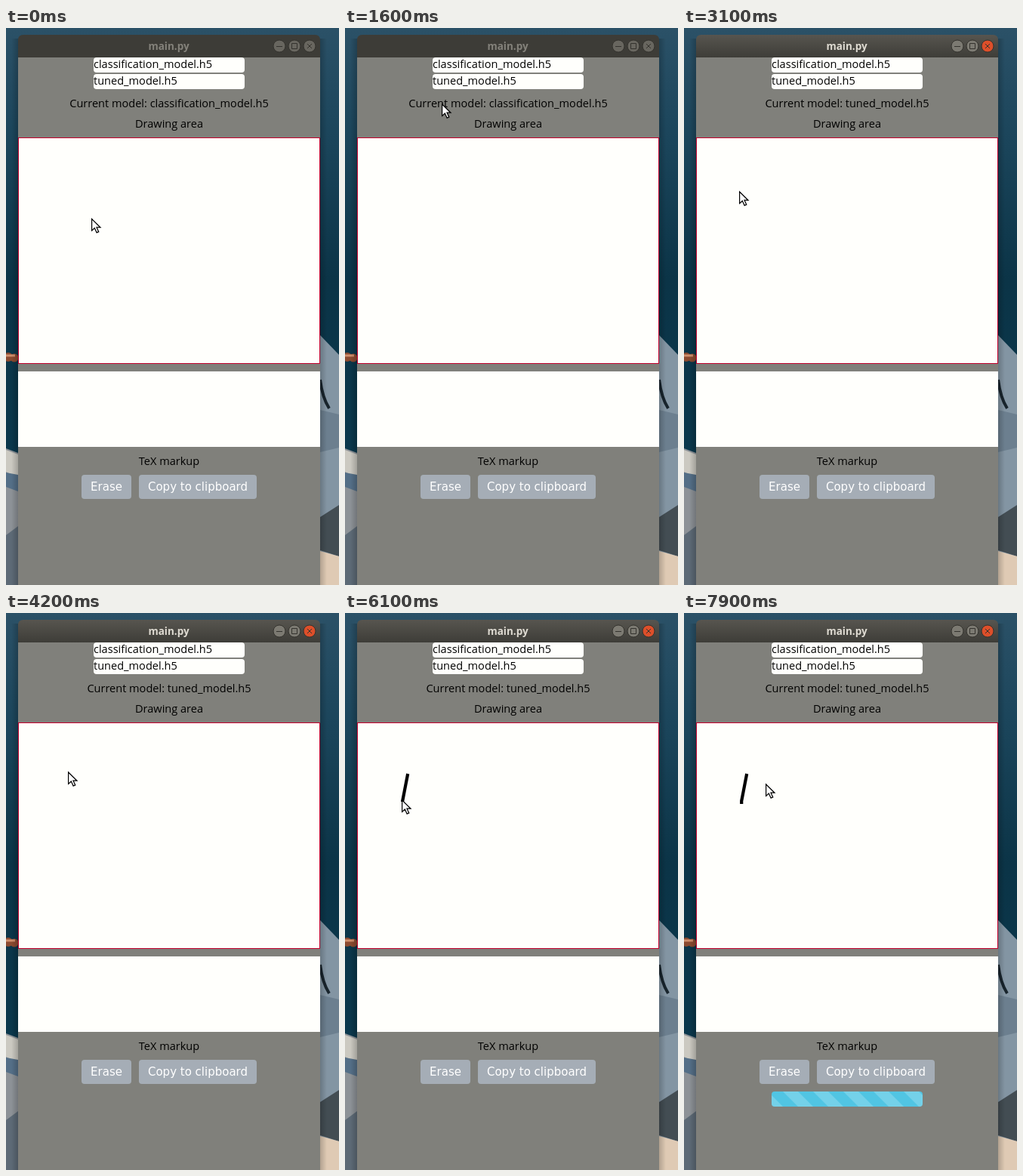
Recreate the animation shown at these times as an HTML page. Size 441 by 738 pixels, loop 8 s.

```html
<!DOCTYPE html>
<html lang="en">
<head>
<meta charset="utf-8">
<title>main.py</title>
<style>
  html, body { margin: 0; width: 100%; height: 100%; overflow: hidden; background: #808079; }
  svg { display: block; width: 441px; height: 738px; }
  text { font: 14.55px "Open Sans", "Noto Sans", sans-serif; }
  .mid { text-anchor: middle; }
  .title { font-size: 13.5px; font-weight: 700; }
  .btn { font: 15px "DejaVu Sans", sans-serif; fill: #fff; }
</style>
</head>
<body>
<svg viewBox="0 0 441 738">
  <defs>
    <linearGradient id="sea" x2="0" y2="1">
      <stop offset="0" stop-color="#2b5167"/>
      <stop offset=".2" stop-color="#1b455b"/>
      <stop offset=".45" stop-color="#0b3447"/>
      <stop offset="1" stop-color="#0a3a50"/>
    </linearGradient>
    <linearGradient id="bar" x2="0" y2="1">
      <stop offset="0" stop-color="#57554f"/>
      <stop offset="1" stop-color="#3e3d38"/>
    </linearGradient>
    <linearGradient id="shade">
      <stop offset="0" stop-opacity="0"/>
      <stop offset="1" stop-opacity=".2"/>
    </linearGradient>
    <pattern id="stripes" width="40" height="40" patternUnits="userSpaceOnUse">
      <path d="M0 0H20L40 20V40ZM0 20 20 40H0Z" fill="#fff" fill-opacity=".2"/>
    </pattern>
  </defs>

  <!-- wallpaper -->
  <rect width="441" height="738" fill="url(#sea)"/>
  <g fill="#8b4a30">
    <circle cx="3" cy="436" r="6"/>
    <circle cx="11" cy="437" r="5.5"/>
  </g>
  <path d="M0 434H12" stroke="#cf8e6c" stroke-width="3"/>
  <path d="M0 557 16 563V738H0Z" fill="#8d9297"/>
  <path d="M0 559 16 565V596L0 588Z" fill="#cbc9c1"/>
  <path d="M0 589 16 592V614L0 608Z" fill="#546f87"/>
  <path d="M0 672 16 660V738H0Z" fill="#5d6a76"/>
  <path d="M416 407 441 433V738H416Z" fill="#8395a3"/>
  <path d="M416 466Q419 490 428 504" fill="none" stroke="#18242c" stroke-width="4"/>
  <path d="M416 506 441 512V556L416 562Z" fill="#6c7f8f"/>
  <path d="M416 648 441 632V700L416 692Z" fill="#434d53"/>
  <path d="M416 693 441 700V738H416Z" fill="#dfcab4"/>
  <rect x="7" y="14" width="9" height="724" fill="url(#shade)"/>
  <rect x="-425" y="14" width="9" height="724" fill="url(#shade)" transform="scale(-1 1)"/>

  <!-- window -->
  <path id="head" d="M16 39V16Q16 9 23 9H409Q416 9 416 16V39Z"/>
  <text id="name" class="mid title" x="215.5" y="29">main.py</text>
  <g id="controls" stroke="#34332e">
    <circle cx="362" cy="24" r="8"/>
    <circle cx="382" cy="24" r="8"/>
    <circle id="close" cx="402" cy="24" r="8"/>
    <path d="M358 24.5h8M378.5 20.5h7v7h-7ZM399 21l6 6M405 21l-6 6" fill="none"/>
  </g>
  <rect x="16" y="39" width="400" height="699" fill="#80807b"/>
  <g fill="#fffffc">
    <rect x="116" y="39" width="200" height="20" rx="4"/>
    <rect x="116" y="61" width="200" height="20" rx="4"/>
    <rect x="16.5" y="145.5" width="399" height="299" stroke="#c4002c"/>
    <rect x="16" y="455" width="400" height="100"/>
  </g>
  <text x="116" y="53">classification_model.h5</text>
  <text x="116" y="75">tuned_model.h5</text>
  <text id="model" class="mid" x="216" y="105"></text>
  <text class="mid" x="216" y="132">Drawing area</text>
  <text class="mid" x="216" y="579">TeX markup</text>
  <g fill="#a5adb6">
    <rect x="100" y="592" width="66" height="32" rx="4"/>
    <rect x="176" y="592" width="156" height="32" rx="4"/>
  </g>
  <text class="mid btn" x="133" y="613">Erase</text>
  <text class="mid btn" x="254" y="613">Copy to clipboard</text>
  <g id="progress">
    <rect x="116" y="634" width="200" height="20" rx="4" fill="#51c5e3"/>
    <rect x="116" y="634" width="200" height="20" rx="4" fill="url(#stripes)"/>
  </g>

  <polyline id="ink" fill="none" stroke="#000" stroke-width="4.2" stroke-linejoin="round"/>
  <g id="cursor">
    <path d="M1.5 2.5V17.5l4-3.5 2.8 5.8 2.8-1.3-2.7-5.6h4.6Z" fill-opacity=".12"/>
    <path d="M.6 1V16.5l3.7-3.4 2.8 6 2.6-1.2-2.7-5.7h5Z" fill="#fff" stroke="#000" stroke-width="1.2"/>
  </g>
</svg>
<script>
  const LOOP = 8000, STEP = 100;
  const FOCUS = 2400, LOADED = 2900, BUSY = 7800;
  const PEN_DOWN = 5400, PEN_UP = 6300;

  // Each glide eases the pointer from where it rests to a new spot.
  const home = [113, 252];
  const glides = [
    { from: 0, to: 400, at: [150, 291] },
    { from: 500, to: 900, at: [195, 232] },
    { from: 900, to: 1400, at: [92, 125] },
    { from: 1400, to: 1600, at: [128, 100] },
    { from: 1700, to: 1900, at: [146, 65] },
    { from: 2700, to: 3100, at: [73, 216] },
    { from: 3100, to: 3500, at: [102, 237] },
    { from: 3800, to: 4200, at: [82, 210] },
    { from: PEN_DOWN, to: 5900, at: [75, 246] },
    { from: 6000, to: PEN_UP, at: [75, 250] },
    { from: 6400, to: 6700, at: [108, 235] },
    { from: 7000, to: 7500, at: [108, 226] }
  ];

  const $ = id => document.getElementById(id);
  const set = (id, key, value) => $(id).setAttribute(key, value);
  const clamp = k => Math.min(1, Math.max(0, k));
  const smooth = k => k * k * (3 - 2 * k);

  const pointer = t => glides.reduce((pos, { from, to, at }) => {
    const k = smooth(clamp((t - from) / (to - from)));
    return pos.map((p, i) => p + (at[i] - p) * k);
  }, home);

  function inkAt(t) {
    const points = [];
    for (let s = PEN_DOWN; s <= Math.min(t, PEN_UP); s += STEP) {
      const [x, y] = pointer(s);
      points.push(`${x + 1.2},${y + 3}`);
    }
    return points.join(' ');
  }

  function draw(t) {
    const focused = t >= FOCUS;
    set('head', 'fill', focused ? 'url(#bar)' : '#3d3c37');
    set('name', 'fill', focused ? '#dfdbd2' : '#84827b');
    set('controls', 'fill', focused ? '#7c7a72' : '#68665f');
    set('close', 'fill', focused ? '#dd4f2a' : '#68665f');
    $('model').textContent =
      `Current model: ${t >= LOADED ? 'tuned' : 'classification'}_model.h5`;
    set('ink', 'points', inkAt(t));
    set('cursor', 'transform', `translate(${pointer(t).map(Math.round)})`);
    set('progress', 'visibility', t >= BUSY ? 'visible' : 'hidden');
    set('stripes', 'patternTransform', `translate(${133 - (t - BUSY) / 50} 634)`);
  }

  function tick() {
    draw(Math.floor(performance.now() % LOOP / STEP) * STEP);
    requestAnimationFrame(tick);
  }
  tick();
</script>
</body>
</html>
```
